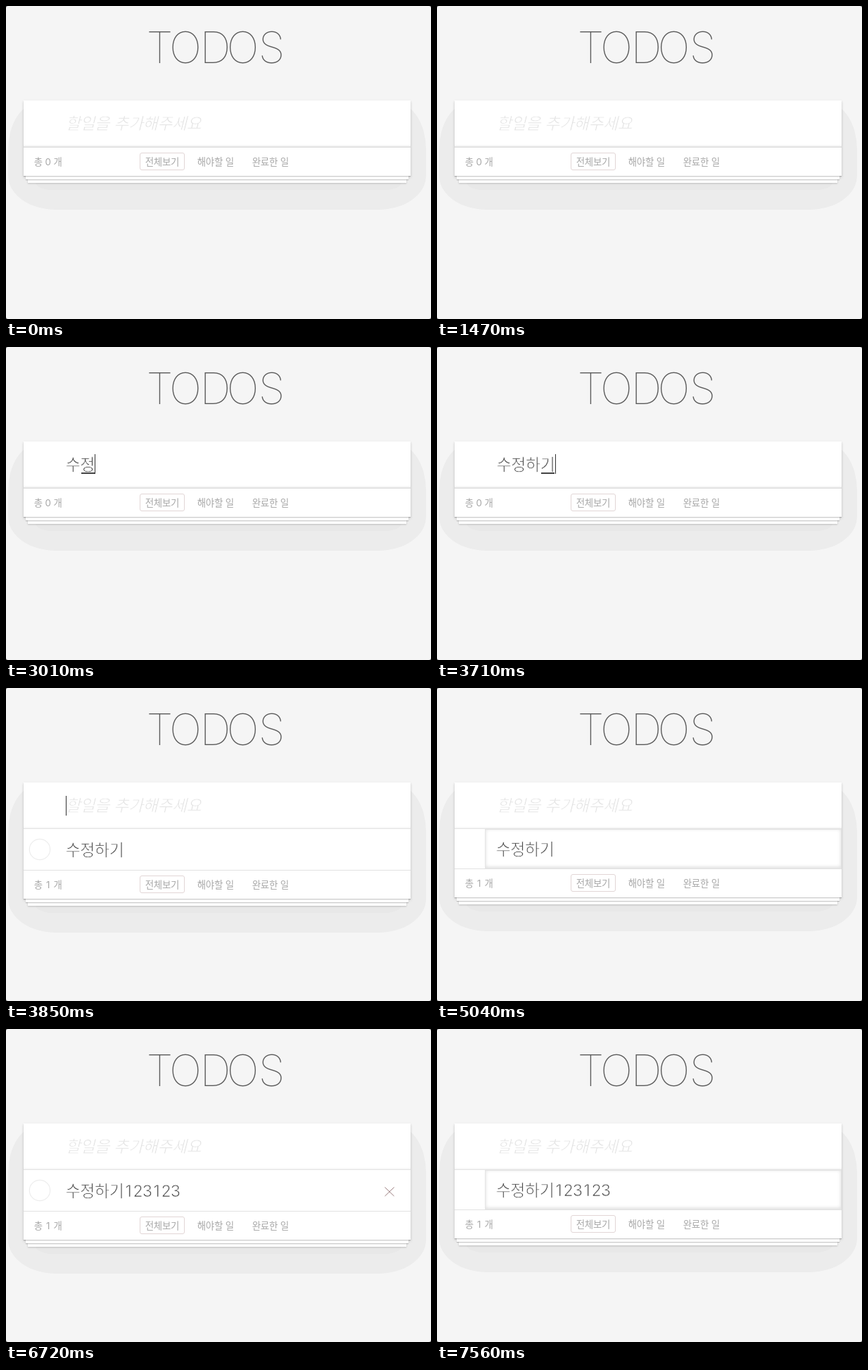
These frames come from a looping animation (604x444 px, 8 s). An HTML page:

```html
<!DOCTYPE html>
<html lang="ko">
<head>
<meta charset="utf-8">
<title>Todos</title>
<style>
  html, body { margin: 0; width: 100%; height: 100%; overflow: hidden; background: #555; }
  #stage { position: absolute; left: 0; top: 0; width: 604px; height: 444px; overflow: hidden; background: #f5f5f5; border-radius: 3px; }
  #stage div, svg { position: absolute; box-sizing: border-box; }
  #halo { left: 3px; top: 138px; width: 594px; background: #ececec; border-radius: 42px 42px 68px 68px / 66px 66px 48px 48px; }
  #core { left: 42px; top: 200px; width: 520px; background: #e8e8e8; border-radius: 0 0 24px 24px / 0 0 11px 11px; }
  #card {
    left: 25px; top: 134px; width: 550px; background: #fff;
    box-shadow: 0 1px 1px rgba(0,0,0,.2), 0 8px 0 -3px #fcfcfc, 0 9px 1px -3px rgba(0,0,0,.2),
      0 16px 0 -6px #fcfcfc, 0 17px 2px -6px rgba(0,0,0,.2), 0 2px 4px rgba(0,0,0,.15);
  }
  #head { left: 0; top: 0; width: 550px; height: 65px; box-shadow: inset 0 -2px 1px rgba(0,0,0,.03); }
  #main { left: 0; top: 65px; width: 550px; border-top: 1px solid #e2e2e2; }
  #edit { left: 43px; top: 0; width: 507px; height: 56px; border: 1px solid #e6e6e6; box-shadow: inset 0 -1px 5px rgba(0,0,0,.14); }
  #foot { left: 0; bottom: 0; width: 550px; height: 41px; border-top: 1px solid #e2e2e2; }
  #tab { left: 165px; top: 7px; width: 64px; height: 25px; border: 1px solid #e2d6d6; border-radius: 3px; }
  svg { left: 0; top: 0; }
  text { font-family: Inter, "Noto Sans CJK KR", "Noto Sans CJK JP", "Noto Sans CJK", sans-serif; text-anchor: middle; }
  .title { font-weight: 100; font-optical-sizing: none; font-variation-settings: "opsz" 14; fill: #5a5a5a; }
  /* A card-coloured outline slims the strokes. */
  .big { fill: #4c4c4c; stroke: #fff; stroke-width: .75; }
  .hint { fill: #e4e4e4; stroke: #fff; stroke-width: .6; font-style: italic; }
  .small { fill: #a8a8a8; }
</style>
</head>
<body>
<div id="stage">
  <div id="halo"></div>
  <div id="core"></div>
  <div id="card">
    <div id="head"></div>
    <div id="main"><div id="edit"></div></div>
    <div id="foot"><div id="tab"></div></div>
  </div>
  <svg width="604" height="444">
    <text class="title" x="218.5 255 297.5 336.5 377.5" y="80.5" font-size="61.5">TODOS</text>
    <g id="ink"></g>
    <circle id="check" cx="48" cy="229" r="14.7" fill="none" stroke="#ededed" stroke-width="1.2"/>
    <path id="cross" d="M538.5 224.5l13 12.5m0-12.5l-13 12.5" fill="none" stroke="#9a7c7d"/>
    <rect id="under" y="178" height="2" width="19" fill="#444"/>
    <rect id="caret" width="1" height="28" fill="#333"/>
    <g id="bar"></g>
  </svg>
</div>
<script>
const LOOP = 8000;
const $ = id => document.getElementById(id);
const view = Object.fromEntries(
  ['halo', 'core', 'card', 'edit', 'check', 'cross', 'under', 'caret', 'bar'].map(id => [id, $(id)]));

// Advance of a character in em: digit, space or Hangul.
const advance = c => c === ' ' ? .278 : /\d/.test(c) ? .556 : .86;
const width = (s, size) => [...s].reduce((w, c) => w + advance(c) * size, 0);

function label(parent, cls, size) {
  const el = document.createElementNS('http://www.w3.org/2000/svg', 'text');
  el.setAttribute('class', cls);
  el.setAttribute('font-size', size * .96);
  parent.append(el);
  return (s, x, y) => {
    const centers = [...s].map(c => {
      const w = advance(c) * size, mid = x + w / 2;
      x += w;
      return mid.toFixed(2);
    });
    el.setAttribute('x', centers.join(' '));
    el.setAttribute('y', y);
    el.textContent = s;
  };
}

const hint = label($('ink'), 'hint', 24);
const draft = label($('ink'), 'big', 24);
const item = label($('ink'), 'big', 24);
const total = label(view.bar, 'small', 14);
[['전체보기', 198], ['해야할 일', 272], ['완료한 일', 350]]
  .forEach(([s, x]) => label(view.bar, 'small', 14)(s, x, 226));

// Each step changes only the named parts of the state.
const typed = s => ({ draft: s, caret: true });
const steps = [
  [0, { draft: '', caret: false, item: '', edit: false, cross: false }],
  [910, { caret: true }],
  [1470, { caret: false }],
  [1820, typed('ㅅ')],
  [2030, typed('')],
  [2380, { caret: false }],
  [2660, typed('ㅅ')],
  [2730, typed('수')],
  [2870, typed('숮')],
  [2940, typed('수저')],
  [3010, typed('수정')],
  [3150, typed('수정ㅎ')],
  [3500, typed('수정하')],
  [3640, typed('수정학')],
  [3710, typed('수정하기')],
  [3850, { draft: '', item: '수정하기' }],
  [4340, { caret: false }],
  [4480, { cross: true }],
  [5040, { edit: true }],
  [5460, { caret: true }],
  [6020, { item: '수정하기12' }],
  [6090, { item: '수정하기123' }],
  [6300, { item: '수정하기12312' }],
  [6370, { item: '수정하기123123' }],
  [6720, { edit: false, caret: false }],
  [7490, { edit: true }]
];

const show = (el, on) => el.style.display = on ? '' : 'none';

function draw(s) {
  const rowHeight = !s.item ? 0 : s.edit ? 56 : 58;
  const bottom = 241 + rowHeight;
  view.card.style.height = bottom - 134 + 'px';
  view.halo.style.height = bottom + 48 - 138 + 'px';
  view.core.style.height = bottom + 20 - 200 + 'px';
  view.bar.setAttribute('transform', `translate(0 ${rowHeight})`);

  hint(s.draft ? '' : '할일을 추가해주세요', 85, 175);
  draft(s.draft, 85, 175);
  item(s.item, s.edit ? 84 : 85, s.edit ? 237 : 238);
  total(`총 ${s.item ? 1 : 0} 개`, 40, 226);

  show(view.edit, s.edit);
  show(view.check, s.item && !s.edit);
  show(view.cross, s.cross && !s.edit);
  show(view.under, s.draft);
  show(view.caret, s.caret);

  const end = 85 + width(s.draft, 24);
  view.under.setAttribute('x', Math.round(end - 19.6));
  view.caret.setAttribute('x', s.edit ? Math.round(84 + width(s.item, 24)) : Math.round(end));
  view.caret.setAttribute('y', s.edit ? 214 : s.draft ? 152 : 153);
}

let last = -1;
function tick() {
  const t = performance.now() % LOOP;
  const count = steps.filter(([at]) => at <= t).length;
  if (count !== last) {
    last = count;
    draw(Object.assign({}, ...steps.slice(0, count).map(([, part]) => part)));
  }
  requestAnimationFrame(tick);
}
tick();
</script>
</body>
</html>
```
